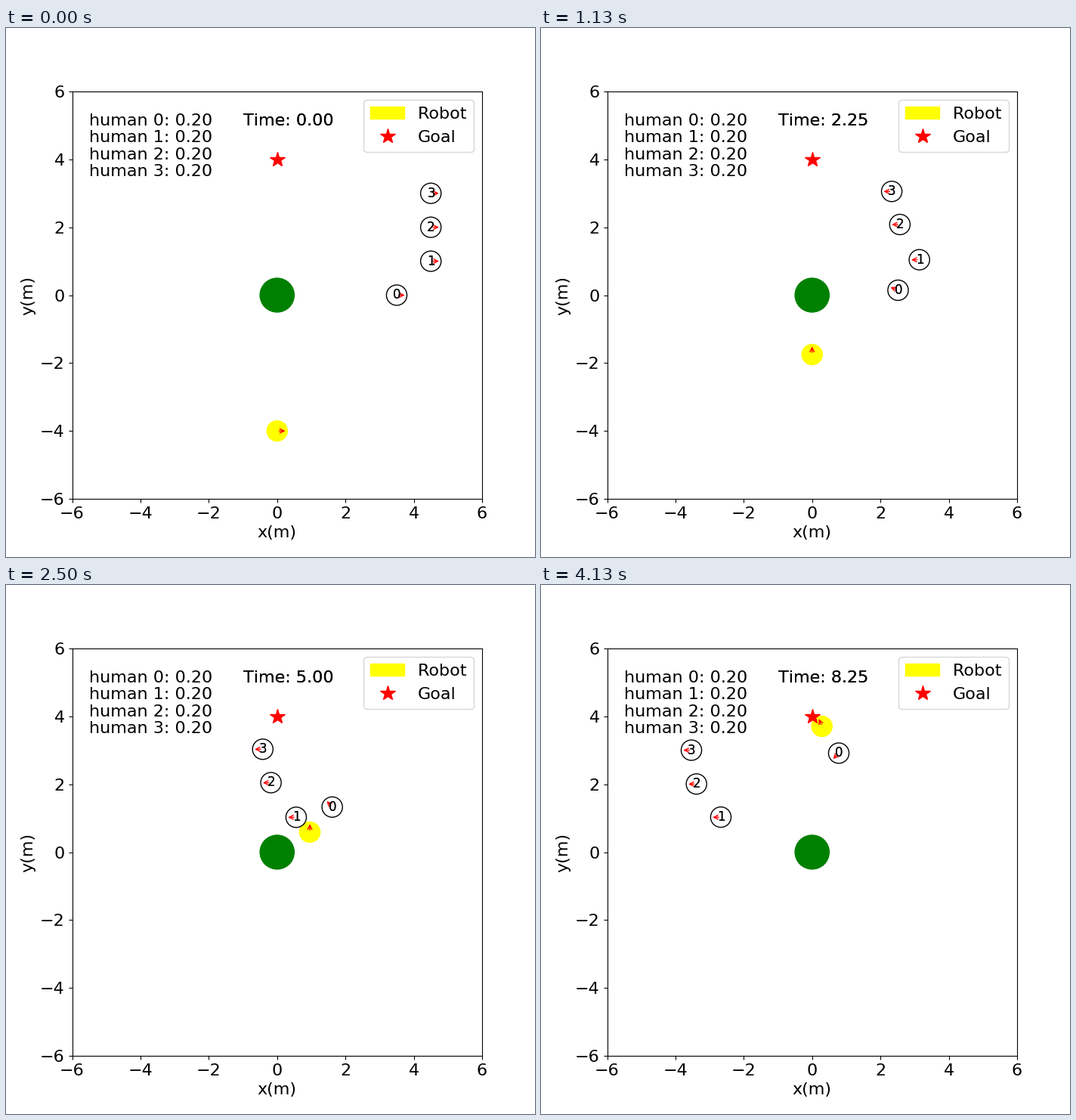
Recreate the animation shown at these times as a matplotlib script. Size 700 by 700 pixels, loop 4260 ms.

```python
import numpy as np
import matplotlib.pyplot as plt
from matplotlib.animation import FuncAnimation
from matplotlib.lines import Line2D
from matplotlib.patches import ArrowStyle, Circle, FancyArrowPatch

LOOP_MS, TICK_MS, STEP_MS = 4260, 30, 125
STEPS = 34
DT = 0.25
RADIUS = 0.3
GOAL_X = -4
CLEARANCE = 1.1
FONT = 16

plt.rcParams["text.kerning_factor"] = 6


def robot_path():
    """Full speed along 16-way headings, with one slow step as it swerves."""
    heading = np.radians(np.repeat([90, 22.5, 45, 67.5, 90, 112.5],
                                   [9, 1, 1, 7, 8, 7]))
    speed = np.where(heading == np.radians(22.5), 0.478, 1)
    moves = DT * speed * np.array([np.cos(heading), np.sin(heading)])
    return np.vstack([[0, -4], [0, -4] + np.cumsum(moves.T, axis=0)])


def walker_path(row, lag, rise):
    """Speed up, drift up for a second, then head left past the obstacle."""
    x, y = 4.5, row
    path = [(x, y)]
    for t in np.arange(1, STEPS) * DT:
        tau = 1.2 * lag
        step = DT - lag * (np.exp(-(t - DT) / tau) - np.exp(-t / tau))
        step = min(step, DT * (x - GOAL_X))
        y += step * (row - y) / (x - GOAL_X) + (rise * DT if t <= 1 else 0)
        x -= step
        y = max(y, np.sqrt(max(CLEARANCE**2 - x**2, 0)))
        path.append((x, y))
    return np.array(path)


def smooth_path(points):
    """Cubic Hermite curve through (time, x, y) points."""
    t, *axes = np.array(points, float).T
    now = np.arange(STEPS) * DT
    i = np.clip(np.searchsorted(t, now, side="right") - 1, 0, len(t) - 2)
    h = t[i + 1] - t[i]
    u = (now - t[i]) / h
    ease = u * u * (3 - 2 * u)
    curves = []
    for p in axes:
        v = np.gradient(p, t)
        curves.append(p[i] + (p[i + 1] - p[i]) * ease
                      + h * u * (1 - u) * ((1 - u) * v[i] - u * v[i + 1]))
    return np.column_stack(curves)


def headings(path):
    dx, dy = np.diff(path, axis=0).T
    return np.concatenate([[0], np.arctan2(dy, dx)])


def heavy_text(x, y, text, size):
    """Text that is drawn twice, so its edges look darker."""
    label = ax.text(x, y, text, fontsize=size, color="black")
    ax.add_artist(label)
    return label


paths = [
    robot_path(),
    smooth_path([(0, 3.5, 0), (1, 3.1, 0.02), (2.25, 2.516, 0.145),
                 (4.25, 2.085, 0.8), (5.75, 1.189, 1.96), (7, 1.11, 3.117),
                 (7.5, 1.15, 3.28), (8.25, 0.78, 2.917)]),
    walker_path(1, lag=1.08, rise=0.05),
    walker_path(2, lag=0.32, rise=0.1),
    walker_path(3, lag=0.08, rise=0.07),
]
angles = [headings(p) for p in paths]

fig, ax = plt.subplots(figsize=(7, 7), dpi=100)
ax.tick_params(labelsize=FONT)
ax.set_xlim(-6, 6)
ax.set_ylim(-6, 6)
ax.set_xticks(range(-6, 7, 2))
ax.set_yticks(range(-6, 7, 2))
ax.set_xlabel("x(m)", fontsize=FONT)
ax.set_ylabel("y(m)", fontsize=FONT)

ax.add_patch(Circle((0, 0), 0.5, color="green"))
robot = ax.add_patch(Circle((0, -4), RADIUS, color="yellow"))
goal = ax.add_line(Line2D([0], [4], color="red", marker="*",
                          linestyle="None", markersize=15))
ax.legend([robot, goal], ["Robot", "Goal"], fontsize=FONT, loc="upper right")

bodies = [robot]
numbers = []
for i in range(len(paths) - 1):
    bodies.append(ax.add_patch(Circle((0, 0), RADIUS, fill=False)))
    numbers.append(heavy_text(0, 0, str(i), 12))
    ax.text(-5.5, 5 - 0.5 * i, f"human {i}: 0.20", fontsize=FONT)
clock = heavy_text(-1, 5, "Time: 0.00", FONT)

style = ArrowStyle("->", head_length=4, head_width=2)
arrows = [ax.add_patch(FancyArrowPatch((0, 0), (1, 0), color="red",
                                       arrowstyle=style, mutation_scale=1))
          for _ in bodies]


def update(tick):
    # A step shows from the tick in which it begins
    k = min(((tick + 1) * TICK_MS - 1) // STEP_MS, STEPS - 1)
    for body, arrow, path, angle in zip(bodies, arrows, paths, angles):
        x, y = path[k]
        body.center = x, y
        arrow.set_positions((x, y), (x + RADIUS * np.cos(angle[k]),
                                     y + RADIUS * np.sin(angle[k])))
    for number, path in zip(numbers, paths[1:]):
        number.set_position(path[k] - 0.11)
    clock.set_text(f"Time: {k * DT:.2f}")
    return bodies + arrows + numbers + [clock]


anim = FuncAnimation(fig, update, frames=LOOP_MS // TICK_MS, interval=TICK_MS,
                     repeat=True, repeat_delay=0, blit=False)
plt.show()
```
